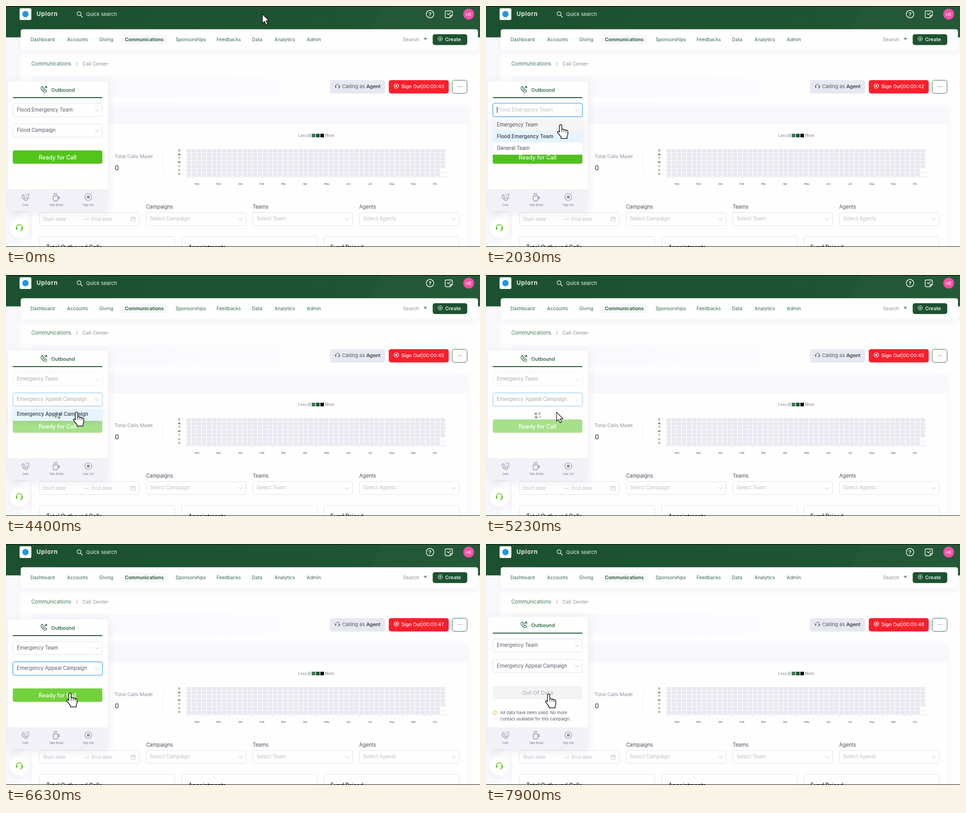
Recreate the animation shown at these times as an HTML page. Size 1048 px wide and 534 px high, loop 8 s.

```html
<!DOCTYPE html>
<html lang="en">
<head>
<meta charset="utf-8">
<title>Call center</title>
<style>
  html, body { margin: 0; width: 100%; height: 100%; overflow: hidden; background: #fff; }
  svg { display: block; width: 100%; height: 100%; font-family: Inter, Lato, sans-serif; }
  text { white-space: pre; }
</style>
</head>
<body>
<svg viewBox="0 0 1048 534" preserveAspectRatio="none">
  <defs>
    <linearGradient id="header"><stop offset="0" stop-color="#1c5130"/><stop offset="1" stop-color="#205633"/></linearGradient>
    <linearGradient id="fade"><stop offset="0" stop-color="#f8f8fc"/><stop offset=".6" stop-color="#fdfdff"/><stop offset=".8" stop-color="#fefefe"/></linearGradient>
    <filter id="shadow" x="-30%" y="-30%" width="160%" height="160%"><feDropShadow dx="0" dy="3" stdDeviation="9" flood-color="#4a4a78" flood-opacity=".12"/></filter>
    <filter id="soft" x="-30%" y="-50%" width="160%" height="200%"><feDropShadow dx="0" dy="5" stdDeviation="7" flood-color="#4a4a78" flood-opacity=".06"/></filter>
  </defs>
  <g id="page"></g>
  <g id="live"></g>
</svg>
<script>
const LOOP = 8;
const GREEN = '#1d5230', LIME = '#52c41a', GREY = '#8f929f', INK = '#565c68', LINE = '#dfe1e8', PALE = '#bfc0ca', WHITE = '#fefefe';
const page = document.getElementById('page'), live = document.getElementById('live');

const rect = (x, y, w, h, fill, r = 0, more = '') =>
  `<rect x="${x}" y="${y}" width="${w}" height="${h}" rx="${r}" fill="${fill}" ${more}/>`;
const text = (x, y, label, size = 11, fill = INK, weight = 400, more = '') =>
  `<text x="${x}" y="${y}" font-size="${size}" fill="${fill}" font-weight="${weight}" ${more}>${label}</text>`;
const middle = 'text-anchor="middle"';
const path = (d, stroke, width = 1, fill = 'none', more = '') =>
  `<path d="${d}" stroke="${stroke}" stroke-width="${width}" fill="${fill}" stroke-linecap="round" stroke-linejoin="round" ${more}/>`;
const circle = (x, y, r, fill, more = '') => `<circle cx="${x}" cy="${y}" r="${r}" fill="${fill}" ${more}/>`;
const ring = (x, y, r, stroke, width = 1) => circle(x, y, r, 'none', `stroke="${stroke}" stroke-width="${width}"`);
const group = (x, y, body, scale = 1, opacity = 1) =>
  `<g transform="translate(${x} ${y}) scale(${scale})" opacity="${opacity}">${body}</g>`;
const chevron = (x, y) => path(`M${x - 3.5} ${y - 2}l3.5 4 3.5-4`, '#b9bbc5');
const headset = (x, y, color, scale) => group(x, y,
  path('M-6 1A6 6 0 0 1 6 1M6 4Q6 7 1.5 7', color, 1.3) +
  rect(-7, 0, 3, 5, color, 1.4) + rect(4, 0, 3, 5, color, 1.4), scale);
const phone = (x, y, color) => group(x, y,
  path('M-5-4l2-2 3 3-1.5 2Q0 2 2 3L4 1.5 7 4.5 5 7Q2 8-2.5 3.5T-5-4Z', color, 1.2));
const target = (x, y, r, color) => ring(x, y, r, color, 1.2) + rect(x - r * .4, y - r * .4, r * .8, r * .8, color, 1);

const ramp = (t, a, b) => Math.max(0, Math.min(1, (t - a) / (b - a)));
const pulse = (t, a, b, c, d) => Math.min(ramp(t, a, b), 1 - ramp(t, c, d));
const during = (t, a, b) => t >= a && t < b;

function drawHeader() {
  const nav = [[54, 'Dashboard'], [135, 'Accounts'], [206, 'Giving'], [375, 'Sponsorships'],
    [465.5, 'Feedbacks'], [544, 'Data'], [594, 'Analytics'], [665, 'Admin']];
  return rect(0, 0, 1048, 69.5, 'url(#header)') +
    '<path d="M830 0H1048V69.5H797Z" fill="#fff" opacity=".02"/>' +
    rect(0, 0, 1048, 1, '#000') +
    rect(30, 5, 26, 26, '#fff', 3) + circle(43, 18, 7, '#2196e8') +
    text(67.5, 22, 'Uplorn', 13, '#fff', 600, 'letter-spacing=".8"') +
    ring(161.5, 17, 4.2, '#fff', 1.3) + path('M165 20.5l4 4', '#fff', 1.4) +
    text(177, 21.5, 'Quick search', 11, '#e9f1ec') +
    ring(937.5, 18, 8.3, '#fff', 1.5) + text(937.5, 22.5, '?', 12, '#fff', 600, middle) +
    path('M973 11h12q2 0 2 2v8l-5 5h-9q-2 0-2-2v-11q0-2 2-2ZM987 21h-5v5M975.5 17l2.5 2.5 5-5', '#fff', 1.4) +
    circle(1023, 18, 12, '#f54fa5') + text(1023, 21.5, 'HE', 9.5, '#fff', 400, middle) +
    rect(32.5, 51.4, 1011, 46, WHITE, 5, 'filter="url(#soft)"') +
    rect(256, 64, 100, 20.5, '#f6f7f9', 4) +
    nav.map(([x, label]) => text(x, 77.5, label, 10.4, '#35694a')).join('') +
    text(263, 77.5, 'Communications', 10.45, GREEN, 600) +
    text(878, 77.5, 'Search', 10.7, GREY) + '<path d="M923 70.5h8.5l-4.25 5.5Z" fill="#85889a"/>' +
    rect(943.4, 62.4, 76.4, 24.1, GREEN, 5) + ring(960, 73, 4.8, '#fff') +
    path('M957.5 73h5M960 70.5v5', '#fff') + text(971, 77.5, 'Create', 11, '#fff', 500);
}

function drawHeatmap() {
  const left = 399.3, pitch = 11.235, months = 'Nov Dec Jan Feb Mar Apr May Jun Jul Aug Sep Oct'.split(' ');
  const arial = 'text-anchor="middle" font-family="Liberation Sans, sans-serif"';
  let out = text(646.5, 290, 'Less', 8.4, '#7f838d') + text(705, 290, 'More', 8.4, '#7f838d');
  ['#d2d3dc', '#3b7b58', GREEN, '#0b100e'].forEach((color, i) => out += rect(666.5 + i * 9.5, 283, 8, 8, color));
  for (let col = 0; col < 51; col++)
    for (let row = 0; row < (col < 50 ? 7 : 5); row++)
      out += rect(left + col * pitch, 317 + row * 8.7, 10, 7.7, '#e8e8f0');
  [...'SMTWTFS'].forEach((day, i) => out += text(383, 322 + i * 8.7, day, 6, '#444', 700, arial));
  months.forEach((month, i) => out += text(422.5 + i * 47.8, 395.5, month, 6, '#444', 400, arial));
  for (let i = 0; i <= 12; i++) out += path(`M${left + i * 47.75} 378.5v4`, '#d9d9e4', .8);
  return out + path('M399 378.5H972M962 369.3H972', '#d9d9e4', .8);
}

function drawPage() {
  const frame = (x, y, w, h) => rect(x, y, w, h, WHITE, 4, `stroke="${LINE}"`);
  let out = rect(0, 0, 1048, 534, WHITE) + rect(0, 69.5, 32.5, 464, '#f9f9fd') + drawHeader() +
    text(56, 132, 'Communications', 11.1, '#4b785a') + text(155, 132, '/', 11, GREY) +
    text(169, 132, 'Call Center', 10.9, GREY) +
    rect(57, 155, 963, 48, 'url(#fade)', 5) +
    rect(716.3, 164.2, 122, 29.8, '#e7e8f0', 5) + headset(733, 177, '#444a58', .75) +
    text(743, 182, 'Calling as <tspan fill="#232936" font-weight="500">Agent</tspan>', 11) +
    rect(846.3, 164.2, 132.5, 29.6, '#fa1e2c', 5) + target(863, 177, 5, '#fff') +
    rect(986.5, 164.5, 33, 29, WHITE, 5, `stroke="${GREEN}" stroke-width=".9"`);
  for (const x of [999.5, 1003, 1006.5]) out += circle(x, 178.5, .75, GREEN);
  out += rect(57, 220, 963, 330, WHITE, 7, 'filter="url(#soft)"') +
    '<path d="M57 262V227q0-7 7-7H1013q7 0 7 7V262Z" fill="#f8f8fc"/>' +
    text(240, 337, 'Total Calls Made', 10.8, GREY) + text(240.5, 364, '0', 14.5, '#20242c') +
    path('M347.5 325V371', '#eeeef3') + drawHeatmap();
  ['Date', 'Campaigns', 'Teams', 'Agents'].forEach((label, i) => {
    const x = 74 + i * 235.7;
    out += text(x, 449, label, 11.2, '#4a505c') + frame(x, 457.5, 221, 29);
    if (i) out += text(x + 8.5, 475, 'Select ' + ['', 'Campaign', 'Team', 'Agents'][i], 11.1, PALE) + chevron(x + 208.5, 472.5);
  });
  out += text(82, 475.5, 'Start date', 10.9, PALE) + path('M173.5 473H183l-2.5-2', PALE) +
    text(189.5, 475.5, 'End date', 10.9, PALE) +
    path('M277 468.5h8.5v8.5H277ZM277 471.5h8.5M279 467v2M283.5 467v2', PALE);
  ['Total Outbound Calls', 'Appointments', 'Fund Raised'].forEach((label, i) => {
    const x = 74 + i * 314.3;
    out += frame(x, 510.5, 299.5, 40) + text(x + 15, 539, label, 12.4, '#20242c', 500);
  });
  return out + rect(0, 533, 1048, 1, '#000') +
    '<path d="M8 473Q9 456 28 450H52Q46 460 28 462T8 473Z" fill="#f4f4f9"/>' +
    circle(30, 491, 22, WHITE, 'filter="url(#soft)"') + headset(29.5, 490, LIME, 1.1);
}

function field(y, value, { hover, focus, open, caret, clear = 0 }) {
  const empty = value.startsWith('Select');
  return (focus ? rect(14, y - 1, 200, 31.5, 'none', 5, 'stroke="#1890ff" stroke-opacity=".22" stroke-width="2"') : '') +
    rect(15.5, y + .5, 197.5, 29, WHITE, 4, `stroke="${focus ? '#4ba5f0' : hover ? '#78bcf5' : LINE}"`) +
    text(24, y + 18, value, 11.1, empty || open ? PALE : INK) +
    (caret ? path(`M24.5 ${y + 8}v13`, '#333') : '') +
    group(201, y + 15, chevron(0, .5), 1, 1 - clear) +
    group(201, y + 15, circle(0, .5, 4.2, '#b5b5b9') + path('M-1.5-1l3 3m0-3l-3 3', '#fff'), 1, clear);
}

function dropdown(fieldTop, options, selected, hovered, amount) {
  if (amount <= 0) return '';
  let body = rect(0, 0, 198, options.length * 26 + 3, WHITE, 4, 'filter="url(#shadow)"');
  options.forEach((label, i) => {
    const fill = i === selected ? '#e6f4ff' : i === hovered ? '#f5f5f5' : WHITE;
    body += rect(0, 2 + i * 26, 198, 26, fill) + text(9, 18 + i * 26, label, 11.05, '#47505d', i === selected ? 600 : 400);
  });
  return `<g transform="translate(15 ${fieldTop + 33}) scale(1 ${.8 + .2 * amount})" opacity="${amount}">${body}</g>`;
}

function spinner(t, opacity) {
  let dots = '';
  for (let i = 0; i < 4; i++) {
    const angle = t * 5.236 + i * Math.PI / 2;
    const glow = .45 + .2 * Math.sin(t * 2.6 + i * 1.25);
    dots += circle(5.6 * Math.cos(angle), 5.6 * Math.sin(angle), 2.8, '#4e6b58', `opacity="${glow}"`);
  }
  return group(114.5, 311, dots, 1, opacity);
}

function drawButton(t, done) {
  if (done) return rect(15, 320, 198, 29.5, '#f3f3f4', 4) +
    rect(15, 320, 198, 29.5, LIME, 4, `opacity="${.4 * (1 - ramp(t, 7.6, 7.8))}"`) +
    text(114, 339.5, 'Out Of Data', 12.3, '#b3b5c0', 500, middle);
  const shift = 4 * pulse(t, 5.85, 5.9, 5.98, 6.1);
  const glow = t > 6.95 ? rect(14, 319, 200, 31.5, 'none', 5, `stroke="${LIME}" stroke-opacity=".25" stroke-width="2"`) : '';
  return glow + rect(15, 320, 198, 29.5, LIME, 4) +
    rect(15, 320, 198, 29.5, '#73d13d', 4, `opacity="${ramp(t, 5.9, 6.2)}"`) +
    text(114 + shift, 339.5, 'Ready for Call', 12.5, '#fff', 500, middle);
}

function drawPanel(t) {
  const done = t >= 7.6, lift = done ? 5.5 : 0;
  const blink = (t + .3) % 1 < .5;
  const loading = Math.max(pulse(t, 2.52, 2.6, 2.7, 2.82), pulse(t, 4.36, 4.4, 5.75, 6), .6 * pulse(t, 6.95, 7.05, 7.5, 7.6));
  const team = t < 2.5 ? 'Flood Emergency Team' : 'Emergency Team';
  const campaign = t < 2.55 ? 'Flood Campaign' : t < 4.36 ? 'Select Campaign' : 'Emergency Appeal Campaign';
  const tab = phone(83, 184, GREEN) + path('M85 183l5-5m-4 0h4v4', GREEN, 1.2) +
    text(100, 189.5, 'Outbound', 11, GREEN, 500) + rect(15, 202, 198, 2, GREEN);
  const form =
    field(215.5, team, {
      hover: during(t, 1.03, 1.45), focus: during(t, 1.45, 3.06), open: during(t, 1.45, 2.5),
      caret: blink && during(t, 1.45, 3.06), clear: .7 * pulse(t, 1.1, 1.3, 1.6, 1.8) }) +
    field(261, campaign, {
      hover: during(t, 2.6, 3.06), focus: during(t, 3.06, 6.95), open: during(t, 3.06, 4.36),
      caret: blink && during(t, 3.06, 5.2), clear: Math.max(pulse(t, 2.65, 2.8, 3.65, 3.9), .5 * pulse(t, 4.36, 4.38, 4.45, 4.6)) }) +
    drawButton(t, done);
  const notice = done
    ? ring(20, 374, 4.3, '#faad14') + path('M20 372v2.5m0 1.5v.2', '#faad14') +
      text(32, 377, 'All data have been used. No more', 9.25, INK) +
      text(32, 391, 'contact available for this campaign.', 9.25, INK)
    : '';
  const bar = '<path d="M4 406H225V446q0 8-8 8H12q-8 0-8-8Z" fill="#f1f1f7"/>' +
    phone(41, 424, GREY) + path('M43 417h1m3 0h4m-6 4h1m3 0h2m-4 4h4', GREY, 1.3) +
    path('M104.5 421h10v7q0 4-4 4h-2q-4 0-4-4ZM114.5 423h2q2 0 2 2t-2 2h-2M106.5 415v3m3-3v3m3-3v3', GREY, 1.4) +
    target(182, 423.5, 7.5, GREY) +
    [[43, 'Calls'], [111, 'Take Break'], [182, 'Sign Out']].map(([x, s]) => text(x, 443, s, 6, '#777a88', 400, middle)).join('');
  const teamList = dropdown(215.5, ['Emergency Team', 'Flood Emergency Team', 'General Team'],
    t < 2.5 ? 1 : 0, t > 1.8 ? 0 : -1, pulse(t, 1.45, 1.65, 2.5, 2.7));
  const campaignList = dropdown(261, ['Emergency Appeal Campaign'], t < 4.36 ? -1 : 0, t > 3.75 ? 0 : -1, pulse(t, 3.06, 3.26, 4.42, 4.62));
  return rect(4, 167 - lift, 221, 287 + lift, WHITE, 8, 'filter="url(#shadow)"') +
    group(0, -lift, tab + group(0, 0, form, 1, 1 - .5 * loading)) + notice + bar + teamList + campaignList +
    (loading > 0 ? spinner(t, Math.min(1, loading * 1.5)) : '');
}

// Pointer stops: time, x, y; it eases between neighbours.
const stops = [[0, 567, 18], [.2, 567, 18], [1, 200, 232], [1.2, 200, 226], [1.5, 200, 226], [2.2, 159, 269], [3.63, 159, 269],
  [4, 156, 304], [5.3, 156, 304], [5.9, 160, 315], [6.05, 160, 315], [6.8, 138.5, 332.5], [8, 138.5, 332.5]];
const beam = 'M-5-11h3.5l1.5 1 1.5-1H5M0-10V10M-5 11h3.5l1.5-1 1.5 1H5';
const shapes = {
  arrow: path('M0 0V19L4.3 15 7.3 22 10.5 20.6 7.6 13.8H13.5Z', '#111', 1.2, '#fff'),
  beam: path(beam, '#fff', 4) + path(beam, '#222', 2),
  hand: path('M-2.5 2.5a2.5 2.5 0 0 1 5 0V10q2.5-1.5 4.500.8 2.5-1 4 1 4-.5 4 3.2V20q0 2-1.5 4.5V29H1V26L-5.5 18q-2-3 0-4 1.5-.5 3 2Z', '#111', 1.4, '#fff') +
    path('M2.5 10v5M7 11v4M11 12v4', '#111', 1.1)
};

function drawPointer(t) {
  const i = Math.max(1, stops.findIndex(stop => stop[0] > t));
  const [a, x0, y0] = stops[i - 1], [b, x1, y1] = stops[i];
  const p = ramp(t, a, b), e = p * p * (3 - 2 * p);
  const x = x0 + (x1 - x0) * e, y = y0 + (y1 - y0) * e;
  const kind = during(t, 1.03, 1.85) || during(t, 2.6, 3.8) ? 'beam'
    : t < 1.03 || during(t, 4.65, 6.05) ? 'arrow' : 'hand';
  return group(x, y, shapes[kind], kind === 'beam' ? 1 : 1.06);
}

const ticks = [.25, 1.2, 2.2, 3.2, 4.2, 5.3, 6.5, 7.7];
function draw(now) {
  const t = now / 1000 % LOOP;
  const seconds = 40 + ticks.filter(tick => t >= tick).length;
  live.innerHTML =
    text(874, 182, `Sign Out<tspan font-weight="400">|00:00:${seconds}</tspan>`, 10.8, '#fff', 500) +
    drawPanel(t) + drawPointer(t);
  requestAnimationFrame(draw);
}

page.innerHTML = drawPage();
draw(performance.now());
</script>
</body>
</html>
```
